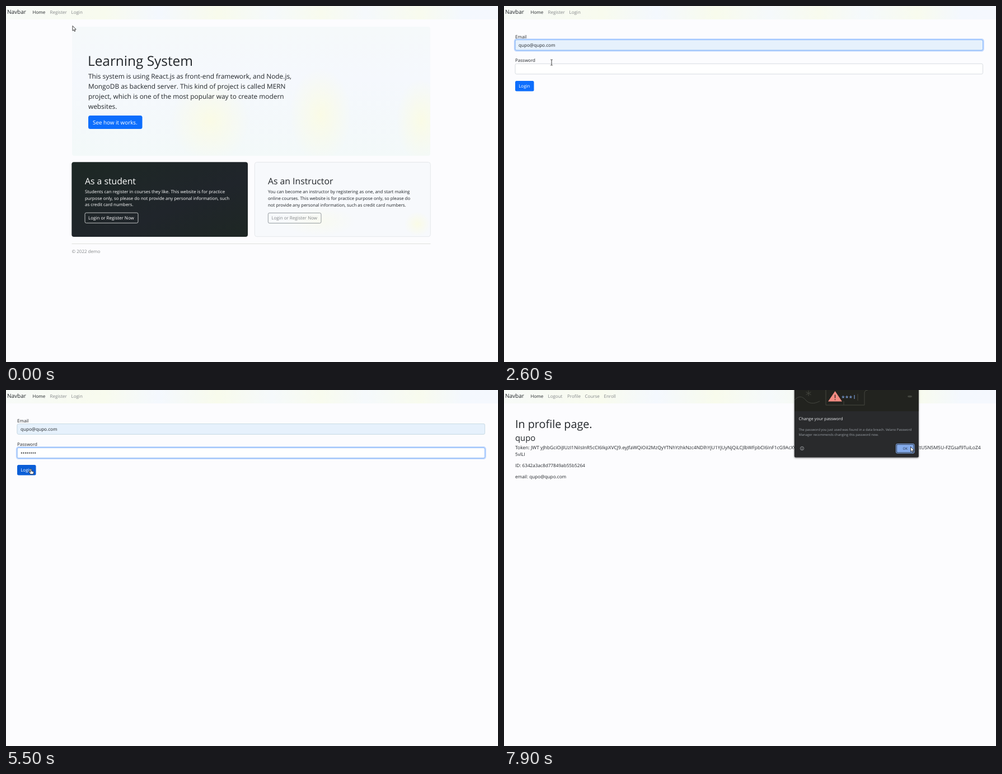
Recreate the animation shown at these times as an HTML page. Size 879 by 637 pixels, loop 8 s.

```html
<!DOCTYPE html>
<html lang="en">
<head>
<meta charset="utf-8">
<title>Learning System demo</title>
<style>
  html, body { margin: 0; width: 100%; height: 100%; overflow: hidden; background: #fcfcfe; }
  svg { display: block; width: 100vw; height: 100vh; }
  text { font: 8px "Open Sans", "Noto Sans", sans-serif; fill: #212529; text-rendering: geometricPrecision; white-space: pre; }
  .brand { font-size: 10px; }
  .muted { fill: #85888a; }
  .title { font-size: 24.4px; }
  .lead { font-size: 11.85px; }
  .heading { font-size: 15.75px; }
  .copy { font-size: 7.88px; }
  .light { fill: #fff; }
  .mail { font-size: 8.15px; }
  .option { font-size: 6.76px; fill: #e8eaed; }
  .field { fill: #fff; stroke: #ced4da; }
  .filled { fill: #e6f1fc; stroke: #c4d8e4; }
  .ring { fill: none; stroke: #86b7fe; stroke-width: 1; }
  .glow { fill: none; stroke: #0d6efd; stroke-opacity: .25; stroke-width: 2; }
  .panel { fill: #292a2c; filter: drop-shadow(0 1px 1.5px #0008); }
  .sketch { fill: none; stroke: #44463f; stroke-width: 1; }
  .pointer path { fill: #fff; stroke: #111; stroke-width: .8; stroke-linejoin: round; }
</style>
</head>
<body>
<svg viewBox="0 0 879 637" preserveAspectRatio="none">
  <defs>
    <linearGradient id="navTint">
      <stop offset="0" stop-color="#f7faf8"/><stop offset=".2" stop-color="#f8fbee"/>
      <stop offset=".31" stop-color="#f4f8fe"/><stop offset=".43" stop-color="#f8fbec"/>
      <stop offset=".54" stop-color="#f5f9fb"/><stop offset=".64" stop-color="#f8fbee"/>
      <stop offset=".73" stop-color="#f5f9fc"/><stop offset=".84" stop-color="#f8fbee"/>
      <stop offset=".93" stop-color="#f4f8fe"/><stop offset="1" stop-color="#f5f8fe"/>
    </linearGradient>
    <linearGradient id="heroTint" x2="0" y2="1">
      <stop offset="0" stop-color="#f5f9fa"/><stop offset=".4" stop-color="#f5f8fd"/><stop offset="1" stop-color="#f3f9f9"/>
    </linearGradient>
    <radialGradient id="warm">
      <stop offset="0" stop-color="#fafbe6"/><stop offset="1" stop-color="#fafbe6" stop-opacity="0"/>
    </radialGradient>
    <linearGradient id="darkCard" y2="1">
      <stop offset="0" stop-color="#1d2824"/><stop offset=".6" stop-color="#20252b"/><stop offset="1" stop-color="#1e2724"/>
    </linearGradient>
    <radialGradient id="press">
      <stop offset="0" stop-color="#f0a0a0" stop-opacity=".65"/><stop offset=".6" stop-color="#dc4a50" stop-opacity=".55"/>
      <stop offset="1" stop-color="#cf2834" stop-opacity=".6"/>
    </radialGradient>
    <clipPath id="heroClip"><rect x="118" y="37" width="640" height="231" rx="4"/></clipPath>
    <g id="okButton">
      <rect x="700.5" y="96.5" width="32.5" height="16.5" rx="2" fill="#303a4a" stroke="#8ab4f8"/>
      <rect x="702" y="98" width="29.5" height="13.5" rx="1" fill="#84abec"/>
      <text x="716.7" y="107" text-anchor="middle" style="font-size:6.2px;fill:#26364f">OK</text>
    </g>
  </defs>

  <rect width="879" height="637" fill="#fcfcfe"/>
  <rect width="879" height="24" fill="url(#navTint)"/>
  <text class="brand" x="2" y="14.3">Navbar</text>
  <text x="47.5" y="13.8">Home</text>
  <g data-on="0 7000">
    <text class="muted" x="78.5" y="13.8">Register</text>
    <text class="muted" x="116.5" y="13.8">Login</text>
  </g>
  <g data-on="7000 8000">
    <text class="muted" x="78.5" y="13.8">Logout</text>
    <text class="muted" x="113" y="13.8">Profile</text>
    <text class="muted" x="144.5" y="13.8">Course</text>
    <text class="muted" x="178.5" y="13.8">Enroll</text>
  </g>

  <!-- Home page -->
  <g data-on="0 1100">
    <g clip-path="url(#heroClip)">
      <rect x="118" y="37" width="640" height="231" fill="url(#heroTint)"/>
      <ellipse cx="365" cy="205" rx="70" ry="75" fill="url(#warm)"/>
      <ellipse cx="562" cy="195" rx="55" ry="85" fill="url(#warm)"/>
      <ellipse cx="742" cy="205" rx="45" ry="75" fill="url(#warm)"/>
    </g>
    <text class="title" x="146" y="107.3">Learning System</text>
    <text class="lead" x="147" y="130">This system is using React.js as front-end framework, and Node.js,</text>
    <text class="lead" x="147" y="148">MongoDB as backend server. This kind of project is called MERN</text>
    <text class="lead" x="147" y="165.7">project, which is one of the most popular way to create modern</text>
    <text class="lead" x="147" y="183.5">websites.</text>
    <rect x="147" y="196" width="96.5" height="24" rx="3.5" fill="#0d6efd"/>
    <text class="light" x="155" y="211.7" style="font-size:9.86px">See how it works.</text>

    <rect x="117.3" y="279.2" width="314.7" height="133.8" rx="4" fill="url(#darkCard)"/>
    <text class="heading light" x="141" y="319">As a student</text>
    <text class="copy light" x="141" y="334.8">Students can register in courses they like. This website is for practice</text>
    <text class="copy light" x="141" y="346.6">purpose only, so please do not provide any personal information, such</text>
    <text class="copy light" x="141" y="358.4">as credit card numbers.</text>
    <rect x="141" y="370" width="95" height="18.3" rx="2.5" fill="none" stroke="#e6e8e8" stroke-width=".8"/>
    <text class="light" x="147" y="381.8">Login or Register Now</text>

    <rect x="444.3" y="279.5" width="314" height="133.2" rx="4" fill="#f7f9fc" stroke="#e0e3e6" stroke-width=".8"/>
    <ellipse cx="735" cy="390" rx="23" ry="22" fill="url(#warm)"/>
    <ellipse cx="560" cy="385" rx="65" ry="27" fill="url(#warm)" opacity=".5"/>
    <text class="heading" x="468" y="319">As an Instructor</text>
    <text class="copy" x="468" y="335">You can become an instructor by registering as one, and start making</text>
    <text class="copy" x="468" y="346.8">online courses. This website is for practice purpose only, so please do</text>
    <text class="copy" x="468" y="358.6">not provide any personal information, such as credit card numbers.</text>
    <rect x="468.3" y="370.3" width="94.7" height="18.3" rx="2.5" fill="none" stroke="#7d848a" stroke-width=".8"/>
    <text class="muted" x="474.3" y="382">Login or Register Now</text>

    <path d="M117.5 425.5H758.5" stroke="#dfe0dc"/>
    <text class="muted" x="117.5" y="442.3">© 2022 demo</text>
  </g>

  <!-- Login page -->
  <g data-on="1100 7000">
    <text x="20" y="57.5">Email</text>
    <rect class="field" x="20" y="60.5" width="835.5" height="18.7" rx="2.5" stroke-width=".8"/>
    <g data-on="2300 7000">
      <rect class="filled" x="20" y="60.5" width="835.5" height="18.7" rx="2.5" stroke-width=".8"/>
      <rect data-on="3900 4600" x="26" y="64" width="20.5" height="12" fill="#2f8bea"/>
      <text class="mail" x="26" y="72.8"><tspan id="account">qupo</tspan>@qupo.com</text>
    </g>
    <g data-on="1700 4600">
      <rect class="glow" x="18.8" y="59.3" width="838" height="21.2" rx="3.5"/>
      <rect class="ring" x="20" y="60.5" width="835.5" height="18.7" rx="2.5"/>
    </g>
    <path data-on="1700 2300" d="M26.5 65.5V75" stroke="#222" stroke-width=".8"/>

    <text x="20" y="100.2">Password</text>
    <rect class="field" x="20" y="103.3" width="835.5" height="18.5" rx="2.5" stroke-width=".8"/>
    <g data-on="4600 5900">
      <rect class="glow" x="18.8" y="102.1" width="838" height="21" rx="3.5"/>
      <rect class="ring" x="20" y="103.3" width="835.5" height="18.5" rx="2.5"/>
    </g>
    <text id="secret" x="26" y="116.2" style="font-size:9.2px"></text>

    <rect id="submit" x="20" y="134" width="33.5" height="18.6" rx="2.5"/>
    <text class="light" x="26.2" y="146.2">Login</text>

    <g data-on="1800 2500">
      <path class="panel" d="M70.5 84H75.5L79.5 79.5L83.5 84H138.5Q140 84 140 85.5V139.5Q140 141 138.5 141H70.5Q69 141 69 139.5V85.5Q69 84 70.5 84Z"/>
      <rect data-on="2200 2500" x="69" y="86" width="71" height="17" fill="#47484b"/>
      <text class="option" x="74.5" y="96.5">qupo@qupo.com</text>
      <text class="option" x="74.5" y="114.5">trif@trif.com</text>
      <text class="option" x="74.5" y="132.3">ezav@ezav.com</text>
    </g>
  </g>

  <g data-on="5900 7000">
    <rect class="panel" x="518.8" y="-10" width="222" height="62.5" rx="2"/>
    <text x="526.7" y="9.3" style="font-size:6.43px;fill:#e8eaed">Login successfully, you are now redirected to the profile page.</text>
    <use href="#okButton" y="-68"/>
  </g>

  <!-- Profile page -->
  <g data-on="7000 8000">
    <text x="20" y="67.6" style="font-size:19.75px">In profile page.</text>
    <text x="20" y="91" style="font-size:14.8px">qupo</text>
    <text x="20" y="106" style="font-size:8.5px">Token: JWT yJhbGciOiJIUzI1NiIsInR5cCI6IkpXVCJ9.eyJfaWQiOiI2MzQyYTNhYzhkNzc4NDlhYjU1YjUyNjQiLCJlbWFpbCI6InF1cG9AcXVwby5jb20iLCJpYXQiOjE2NjU0ODUzOTR9.o1fjp0NAEYjIeEtUSN5M5U-FZGsaf9TuiLoZ4</text>
    <text x="20" y="117.8" style="font-size:8.3px">5vlLI</text>
    <text x="20" y="137.6" style="font-size:8.2px">ID: 6342a3ac8d77849ab55b5264</text>
    <text x="20" y="157.6" style="font-size:8.2px">email: qupo@qupo.com</text>

    <g id="warning">
      <rect class="panel" x="518.8" y="-10" width="222" height="130.5" rx="2"/>
      <path d="M519 0H740.5V38H519Z" fill="#22231f"/>
      <path class="sketch" d="M519 18C527 9 534 12 539 18S553 26 564 20" stroke-width="1.4"/>
      <path class="sketch" d="M575 0V27H644V4Q645 0 650 0M607 20V27M632 7V19"/>
      <path class="sketch" d="M544 1V11M539.5 3.5L548.5 8.5M548.5 3.5L539.5 8.5" stroke-width="1.2"/>
      <ellipse cx="725" cy="11.5" rx="4" ry="1.8" fill="#44463f"/>
      <path d="M591.5 2L604 20.5H579Z" fill="#f28b82"/>
      <path d="M591.5 8.5V14.5M591.5 16.5V18" stroke="#3c2523" stroke-width="1.5"/>
      <text x="603" y="18" style="font-size:10.5px;fill:#8ab4f8;letter-spacing:1px">***</text>
      <path d="M626 9V16" stroke="#8ab4f8"/>
      <text x="526.5" y="54.3" style="font-size:7.4px;fill:#e8eaed">Change your password</text>
      <text x="526.5" y="72.5" style="font-size:5.9px;fill:#9aa0a6">The password you just used was found in a data breach. Velano Password</text>
      <text x="526.5" y="82.2" style="font-size:5.9px;fill:#9aa0a6">Manager recommends changing this password now.</text>
      <circle cx="532.5" cy="104.5" r="3.1" fill="none" stroke="#b4b8bc" stroke-width=".8"/>
      <path d="M532.5 102.6V103.4M532.5 104.1V106.5" stroke="#b4b8bc" stroke-width=".8"/>
      <use href="#okButton"/>
    </g>
  </g>

  <!-- Browser status bar -->
  <g data-on="400 1100">
    <path d="M0 629H128Q130 629 130 631V637H0Z" fill="#202124"/>
    <text x="2" y="636" style="font-size:6px;fill:#d5d7da">localhost:3000/login</text>
  </g>
  <g data-on="7000 7200">
    <path d="M0 629H288Q290 629 290 631V637H0Z" fill="#1e1f1f"/>
    <text x="-1" y="636.3" style="font-size:6px;fill:#d5d7da">Connecting...</text>
  </g>

  <g id="cursor" class="pointer">
    <circle id="halo" fill="url(#press)"/>
    <path id="arrow" d="M0 0V8.8L2 7L3.4 10L4.8 9.4L3.5 6.4H6.2Z"/>
    <path id="hand" d="M-1 0Q0-1 1 0V3.6L4.5 4.4Q5.3 4.8 5 6.2L4.2 9.2H-.7L-3.4 5.6Q-3-.0 -1 6Z"/>
    <path id="beam" d="M-1.8-5H-.4L0-4.5L.4-5H1.8M0-4.5V4.5M-1.8 5H-.4L0 4.5L.4 5H1.8" style="fill:none"/>
  </g>
</svg>
<script>
  const LOOP = 8000, STEP = 100;
  const el = id => document.getElementById(id);
  const timed = [...document.querySelectorAll('[data-on]')].map(node => {
    const [from, to] = node.dataset.on.split(' ').map(Number);
    return { node, from, to };
  });

  // time, x, y of the pointer tip
  const track = [
    [0, 119, 35.5], [200, 121, 31], [500, 127, 13], [1100, 127, 13],
    [1600, 78, 66], [1900, 78, 66], [2300, 85, 95], [2500, 85, 99], [2700, 85, 103],
    [3600, 31, 70], [4000, 33, 71], [4200, 33, 71], [4400, 41, 109], [4700, 41, 109],
    [5000, 43, 125], [5400, 44.5, 141.5], [5700, 44.5, 141.5], [6200, 709.5, 70],
    [6600, 712, 40.5], [7000, 712, 40.5], [7200, 236, 199], [7300, 260, 196], [7900, 726.5, 101.5]
  ];
  // from this time on, the pointer has this shape
  const shapes = [
    [0, 'arrow'], [400, 'hand'], [1200, 'arrow'], [2600, 'beam'],
    [4800, 'arrow'], [5200, 'hand'], [6300, 'arrow']
  ];
  const clicks = [900, 1700, 3700, 3900, 4600, 5600, 6900];

  function pointerAt(t) {
    const next = track.findIndex(point => point[0] > t);
    if (next < 0) return track[track.length - 1].slice(1);
    const [t0, x0, y0] = track[next - 1], [t1, x1, y1] = track[next];
    const p = (t - t0) / (t1 - t0), e = p * p * (3 - 2 * p);
    return [x0 + (x1 - x0) * e, y0 + (y1 - y0) * e];
  }

  const show = (node, on) => { node.style.display = on ? '' : 'none'; };

  function draw(t) {
    timed.forEach(({ node, from, to }) => show(node, t >= from && t < to));

    el('cursor').setAttribute('transform', `translate(${pointerAt(t)})`);
    const shape = shapes.filter(s => s[0] <= t).pop()[1];
    ['arrow', 'hand', 'beam'].forEach(id => show(el(id), id === shape));

    const click = clicks.filter(c => c <= t).pop();
    const age = (t - click) / STEP;
    show(el('halo'), age < 3);
    if (age < 3) {
      el('halo').setAttribute('r', 10 + 2 * age);
      el('halo').setAttribute('opacity', age > 1 ? .5 : 1);
    }

    const typed = Math.max(0, Math.min(8, (t - 4600) / STEP * 2));
    el('secret').textContent = '•'.repeat(typed);
    el('account').style.fill = t >= 3900 && t < 4600 ? '#fff' : '';
    el('submit').setAttribute('fill', t >= 5200 ? '#0b5ed7' : '#0d6efd');

    const opening = t < 7100;
    el('warning').setAttribute('opacity', opening ? .82 : 1);
    el('warning').setAttribute('transform', opening ? 'matrix(1.009 0 0 1.02 -5.7 -4)' : '');
  }

  const start = performance.now();
  function tick() {
    const t = (performance.now() - start) % LOOP;
    draw(Math.floor(t / STEP) * STEP);
    requestAnimationFrame(tick);
  }
  tick();
</script>
</body>
</html>
```
